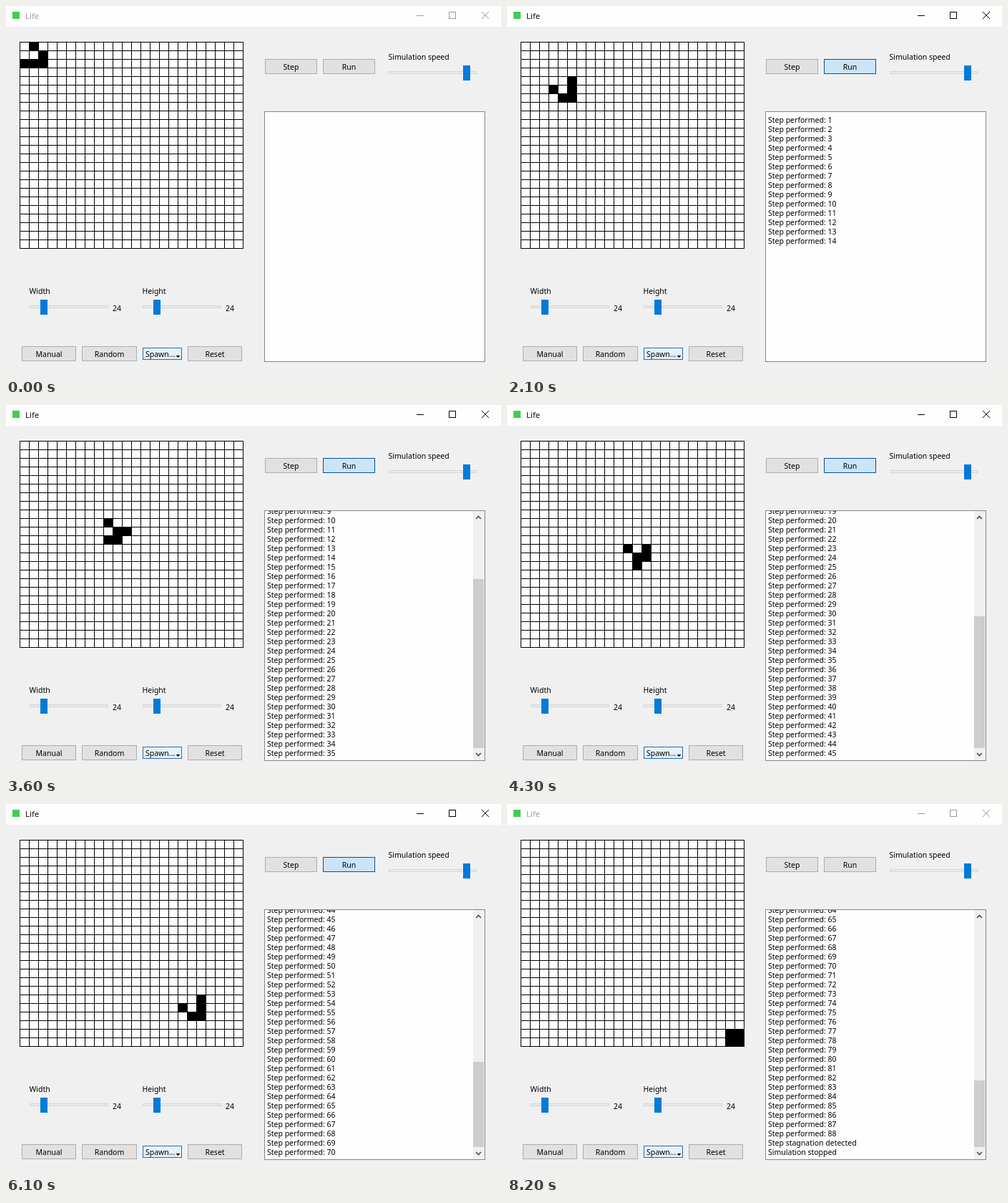
An HTML page with a canvas that plays this animation: 692x518 px, repeating every 8300 ms.

```html
<!DOCTYPE html>
<html lang="en">
<head>
<meta charset="utf-8">
<title>Life</title>
<style>
html, body { margin: 0; overflow: hidden; background: #f0f0f0; }
canvas { display: block; }
</style>
</head>
<body>
<canvas id="stage" width="692" height="518"></canvas>
<script>
const ctx = document.getElementById('stage').getContext('2d');
const LOOP = 8300, TICK = 100, SIZE = 24, LAST_STEP = 88;
const RUN_START = 1036, STEPS_PER_MS = 0.014;
const PAPER = '#fdfefd';
const UI_FONT = '10.5px "Noto Sans", "Open Sans", sans-serif';
const NORMAL = ['#e1e1e1', '#adadad'];
const HOVER = ['#e5f1fb', '#0078d7'];
const PRESSED = ['#cce4f7', '#005499'];

// Game of Life on a bounded board; each generation is a list of [column, row].
function nextGeneration(cells) {
  const alive = new Set(cells.map(([x, y]) => y * SIZE + x));
  const next = [];
  for (let y = 0; y < SIZE; y++) {
    for (let x = 0; x < SIZE; x++) {
      const near = cells.filter(([a, b]) =>
        Math.abs(a - x) < 2 && Math.abs(b - y) < 2 && (a !== x || b !== y)).length;
      if (near === 3 || (near === 2 && alive.has(y * SIZE + x))) next.push([x, y]);
    }
  }
  return next;
}
const generations = [[[1, 0], [2, 1], [0, 2], [1, 2], [2, 2]]];
while (generations.length <= LAST_STEP) generations.push(nextGeneration(generations.at(-1)));

function rect(x, y, w, h, color) {
  ctx.fillStyle = color;
  ctx.fillRect(x, y, w, h);
}

function frame(x, y, w, h, [fill, border]) {
  rect(x, y, w, h, border);
  rect(x + 1, y + 1, w - 2, h - 2, fill);
}

function text(str, x, y, align = 'left', color = '#000', font = UI_FONT) {
  ctx.font = font;
  ctx.textAlign = align;
  ctx.fillStyle = color;
  ctx.fillText(str, x, y);
}

function line(points, color, width = 1) {
  ctx.beginPath();
  points.forEach(([x, y]) => ctx.lineTo(x, y));
  ctx.strokeStyle = color;
  ctx.lineWidth = width;
  ctx.stroke();
}

function button(label, x, y, w, from = NORMAL, to = from, mix = 0) {
  frame(x, y, w, 21, from);
  ctx.globalAlpha = mix;
  frame(x, y, w, 21, to);
  ctx.globalAlpha = 1;
  text(label, x + w / 2, y + 15, 'center');
}

function slider(label, x, y, w, handle) {
  text(label, x - 0.5, y - 16);
  frame(x, y, w, 4, ['#e7eaea', '#d6d6d6']);
  rect(handle, y - 8, 10, 21, '#007ad9');
}

function titleBar(active) {
  const ink = active ? '#000' : '#999';
  rect(0, 0, 692, 29, PAPER);
  rect(9, 8, 10, 10, '#41cd52');
  text('Life', 27, 18, 'left', ink, '11.5px "Open Sans", "Noto Sans", sans-serif');
  rect(574, 13, 10, 1, ink);
  ctx.strokeStyle = ink;
  ctx.lineWidth = 1;
  ctx.strokeRect(619.5, 8.5, 9, 9);
  line([[665, 8], [675, 18]], ink);
  line([[675, 8], [665, 18]], ink);
}

function board(cells) {
  rect(19, 50, 313, 289, PAPER);
  for (let i = 0; i <= SIZE; i++) {
    rect(19 + 13 * i, 50, 1, 289, '#000');
    rect(19, 50 + 12 * i, 313, 1, '#000');
  }
  cells.forEach(([x, y]) => rect(19 + 13 * x, 50 + 12 * y, 14, 13, '#000'));
}

function log(lines) {
  const view = 348, content = 13 * lines.length + 8;
  const scroll = Math.max(0, content - view);
  frame(361, 147, 309, 350, [PAPER, '#828790']);
  ctx.save();
  ctx.beginPath();
  ctx.rect(362, 148, 307, view);
  ctx.clip();
  lines.forEach((str, i) => {
    const y = 163 + 13 * i - scroll;
    if (y > 140) text(str, 365, y);
  });
  ctx.restore();
  if (!scroll) return;
  const thumb = Math.round(314 * view / content);
  rect(653, 148, 16, view, '#f0f0f0');
  rect(653, 479 - thumb, 15, thumb, '#cdcdcd');
  line([[657, 159], [660.5, 155.5], [664, 159]], '#505050', 1.6);
  line([[657, 486], [660.5, 489.5], [664, 486]], '#505050', 1.6);
}

function runButton(t) {
  const fade = start => Math.min(1, (t - start) / 200);
  let state = [NORMAL];
  if (t >= 7400) state = [PRESSED, NORMAL, fade(7400)];
  else if (t >= 1000) state = [HOVER, PRESSED, fade(900)];
  else if (t >= 600) state = [NORMAL, HOVER, fade(500)];
  button('Run', 443, 74, 73, ...state);
}

function draw(t) {
  const step = Math.max(0, Math.min(LAST_STEP, Math.floor((t - RUN_START) * STEPS_PER_MS)));
  const lines = Array.from({ length: step }, (_, i) => `Step performed: ${i + 1}`);
  if (step === LAST_STEP) lines.push('Step stagnation detected', 'Simulation stopped');

  rect(0, 0, 692, 518, '#f0f0f0');
  titleBar(t >= 1000 && t < 8200);
  board(generations[step]);
  button('Step', 362, 74, 73);
  runButton(t);
  slider('Simulation speed', 535, 91, 123, 639);
  slider('Width', 33, 418, 110, 48);
  text('24', 149, 426);
  slider('Height', 191, 418, 110, 206);
  text('24', 307, 426);
  button('Manual', 22, 475, 76);
  button('Random', 106, 475, 77);
  button('Reset', 254, 475, 76);
  frame(191, 477, 55, 17, ['#e5f1fb', '#2a6ca8']);
  text('Spawn...', 195, 490);
  for (let i = 0; i < 3; i++) rect(238 + i, 488 + i, 5 - 2 * i, 1, '#000');
  log(lines);
}

function loop() {
  const t = performance.now() % LOOP;
  draw(Math.floor(t / TICK) * TICK);
  requestAnimationFrame(loop);
}
loop();
</script>
</body>
</html>
```
